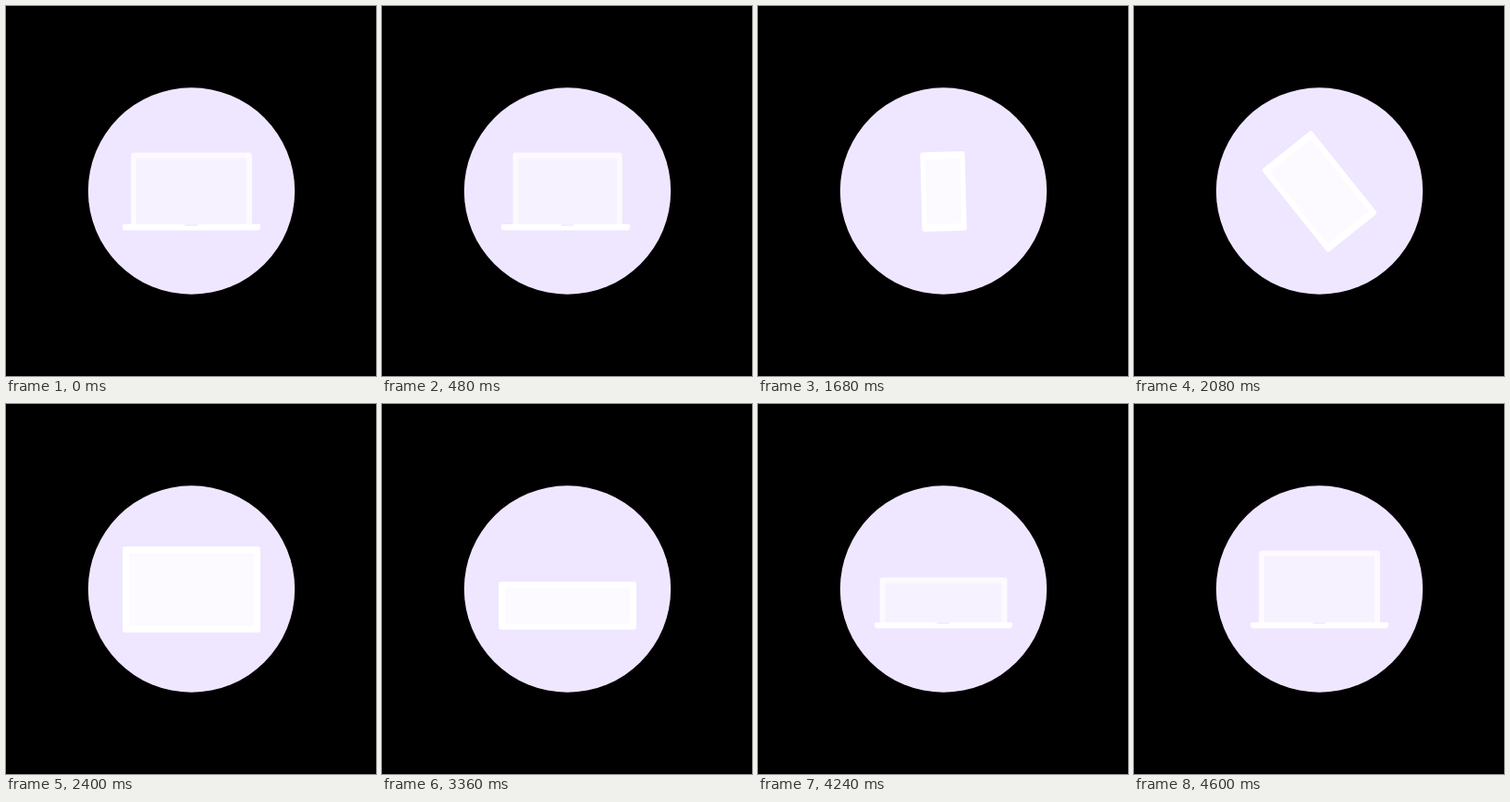
Recreate the animation shown at these times as an HTML page with a canvas. Size 400x400 px, loop 4960 ms.

```html
<!DOCTYPE html>
<html lang="en">
<head>
<meta charset="utf-8">
<title>Shape-shifting device</title>
<style>
html, body { margin: 0; width: 100%; height: 100%; overflow: hidden; background: #000; }
canvas { display: block; width: 100vw; height: 100vh; }
</style>
</head>
<body>
<canvas id="stage" width="400" height="400"></canvas>
<script>
const LOOP = 4960, STEP = 40;
const DISC = '#efe6ff', BODY = '#fff', RIM = '#fdfaff', GLASS = '#fcfaff', DISPLAY = '#f7f2ff', NOTCH = '#f3ecff';
const g = document.getElementById('stage').getContext('2d');

const lerp = (a, b, k) => a + (b - a) * k;
const part = (t, from, to) => Math.min(1, Math.max(0, (t - from) / (to - from)));
const sine = k => (1 - Math.cos(Math.PI * k)) / 2;

function box(x, y, w, h, r, color) {
  if (w <= 0 || h <= 0) return;
  g.fillStyle = color;
  g.beginPath();
  g.roundRect(x, y, w, h, r);
  g.fill();
}

function slab(x, y, w, h, padX, padY) {
  box(x, y, w, h, 3, BODY);
  box(x + padX, y + padY, w - 2 * padX, h - 2 * padY, 0, GLASS);
}

function lid(x, y, w) {
  const pad = Math.min(6, w / 2);
  box(x, y, w, 237 - y, [3, 3, 0, 0], RIM);
  box(x + pad, y + 6, w - 2 * pad, 230 - y, 0, DISPLAY);
}

function base(x, w, notch) {
  box(x, 236, w, 6.5, [1, 1, 3, 3], BODY);
  box(200.5 - 7.5 * notch, 236, 15 * notch, 2, [0, 0, 2, 2], NOTCH);
}

// Front view swings round to a side profile
function turn(t) {
  const a = part(t, 110, 800) ** 2 * Math.PI / 2;
  const c = Math.cos(a), s = Math.sin(a) ** 3.5;
  const left = 200 - 74 * c - 83 * s;
  lid(200 - 65 * c, 158.5, 4 + 127 * c);
  base(left, 203.5 + 71.5 * c - left, c > 0.7 ? c : 0);
}

// Profile snaps shut in a small hop, then faces front as a phone
function fold(t) {
  const k = sine(part(t, 800, 1000));
  const hop = 28 * Math.sin(Math.PI * part(t, 800, 1120));
  const open = sine(part(t, 960, 1160));
  g.save();
  g.translate(0, -hop);
  if (open > 0) {
    const w = lerp(5, 47.5, open);
    slab(lerp(201.5, 200.5, open) - w / 2, 158.5, w, 84, 5 * open, 8);
  } else {
    box(200, 158.5, 4, 84, 1, RIM);
    g.translate(203.5, 239.5);
    g.rotate(k * Math.PI / 2);
    box(-86.5, -3.5, 86.5, 6.5, 2, RIM);
  }
  g.restore();
}

// Phone rolls over and grows into a tablet
function roll(t) {
  const u = part(t, 1620, 2400), k = u ** 1.4;
  const w = lerp(47, 93, k), h = lerp(84, 149, k);
  g.save();
  g.translate(200.5, 200.5);
  g.rotate(-(u ** 1.6) * Math.PI / 2);
  slab(-w / 2, -h / 2, w, h, lerp(5, 7, k), lerp(8, 7, k));
  g.restore();
}

// Tablet tips flat
function flatten(t) {
  const k = sine(part(t, 3080, 3660));
  const bottom = lerp(242.5, 247, (1 - k) ** 1.6);
  const h = lerp(93, 6.5, k);
  slab(126, bottom - h, 149, h, 7, 6.5);
}

function raise(t) {
  const k = sine(part(t, 3740, 4600));
  const half = lerp(74.5, 65.5, k);
  if (k > 0) {
    const y = lerp(236, 158.5, k);
    if (k < 0.12) box(200.5 - half, y, half * 2, 238 - y, [2, 2, 0, 0], BODY);
    else lid(200.5 - half, y, half * 2);
  }
  base(126, 149, 1);
}

function draw(t) {
  g.fillStyle = '#000';
  g.fillRect(0, 0, 400, 400);
  g.fillStyle = DISC;
  g.beginPath();
  g.arc(200.5, 200, 111.7, 0, Math.PI * 2);
  g.fill();
  if (t <= 800) turn(t);
  else if (t < 1640) fold(t);
  else if (t < 3120) roll(t);
  else if (t < 3680) flatten(t);
  else raise(t);
}

const start = performance.now();
function tick() {
  const t = (performance.now() - start) % LOOP;
  draw(Math.floor(t / STEP) * STEP);
  requestAnimationFrame(tick);
}
tick();
</script>
</body>
</html>
```
